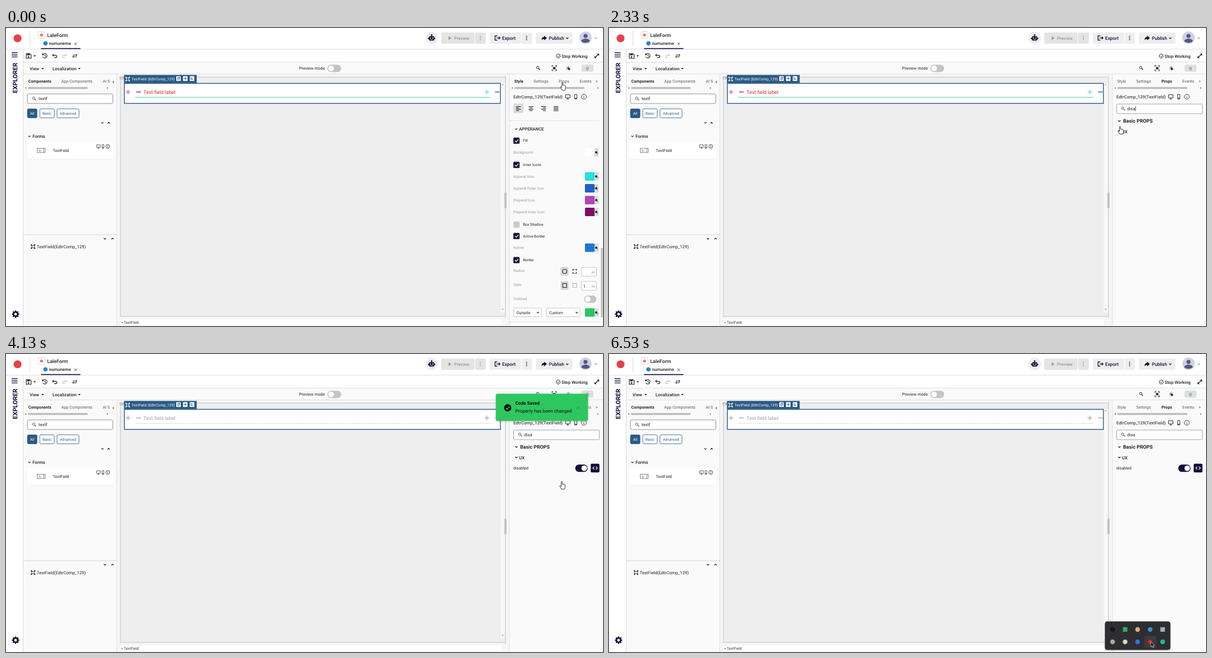
Recreate the animation shown at these times as an HTML page. Size 1059 px wide and 529 px high, loop 7.27 s.

```html
<!DOCTYPE html>
<html lang="en">
<head>
<meta charset="utf-8">
<title>Editor</title>
<style>
html, body { margin: 0; width: 100%; height: 100%; overflow: hidden; background: #fff; }
svg { display: block; width: 1059px; height: 529px; }
text { font-family: Roboto, Arial, sans-serif; text-rendering: geometricPrecision; white-space: pre; }
</style>
</head>
<body>
<svg id="stage" viewBox="0 0 1059 529" xmlns="http://www.w3.org/2000/svg"></svg>
<script>
const NAVY = '#12103a', INK = '#222', GREY = '#999', BLUE = '#2b5a85', LINE = '#d9d9d9';

// Drawing helpers, each returns SVG markup
const text = (x, y, size, str, fill = INK, weight = 400, anchor = 'start') =>
  `<text x="${x}" y="${y}" font-size="${size}" fill="${fill}" font-weight="${weight}" text-anchor="${anchor}">${str}</text>`;
const rect = (x, y, w, h, fill = 'none', stroke = 'none', r = 0, sw = 1) =>
  `<rect x="${x}" y="${y}" width="${w}" height="${h}" fill="${fill}" stroke="${stroke}" stroke-width="${sw}" rx="${r}"/>`;
const circle = (x, y, r, fill = 'none', stroke = 'none', sw = 1) =>
  `<circle cx="${x}" cy="${y}" r="${r}" fill="${fill}" stroke="${stroke}" stroke-width="${sw}"/>`;
const path = (d, stroke = INK, sw = 1, fill = 'none', extra = '') =>
  `<path d="${d}" stroke="${stroke}" stroke-width="${sw}" fill="${fill}" ${extra}/>`;
const shape = (d, fill = INK) => path(d, 'none', 0, fill);
const group = (id, body, extra = '') => `<g id="${id}" ${extra}>${body}</g>`;
const at = (x, y, body, extra = '') => `<g transform="translate(${x} ${y}) ${extra}">${body}</g>`;

// Small icons
const chevron = (x, y, turn = 0, c = INK, s = 2) =>
  at(x, y, path(`M${-s} ${-s / 2}L0 ${s / 2}L${s} ${-s / 2}`, c, 1.1), `rotate(${turn})`);
const caret = (x, y, c = INK) => shape(`M${x - 2.3} ${y - 1}h4.6l-2.3 2.4z`, c);
const arrowHead = (x, y, turn, c = '#8a8a8a') => at(x, y, shape('M-2 -1h4l-2 2.4z', c), `rotate(${turn})`);
const magnifier = (x, y, c = '#555') =>
  circle(x - .8, y - .8, 2.1, 'none', c) + path(`M${x + .8} ${y + .8}l2.6 2.6`, c, 1.2);
const plus = (x, y, c) => path(`M${x - 4} ${y}h8M${x} ${y - 4}v8`, c, 1.2);
const minus = (x, y, c) => path(`M${x - 4} ${y}h8`, c, 1.3);
const cross = (x, y, s, c, w = 1) => path(`M${x - s} ${y - s}l${2 * s} ${2 * s}m0 ${-2 * s}l${-2 * s} ${2 * s}`, c, w);
const kebab = (x, y, c) => [-3, 0, 3].map(d => circle(x, y + d, .9, c)).join('');
const monitor = (x, y, s = 1) =>
  at(x, y, path('M-4 -3.5h8v5.5h-8zM-2 4h4M0 2v2', '#333', 1), `scale(${s})`);
const phone = (x, y, s = 1) => at(x, y, path('M-2 -4h4v8h-4zM-2 2.6h4', '#333', 1), `scale(${s})`);
const info = (x, y, r) => circle(x, y, r, 'none', '#333', .9) + path(`M${x} ${y - r * .6}v1M${x} ${y - r * .1}v${r * .65}`, '#333', 1);
const frameIcon = (x, y, c) =>
  rect(x - 2.2, y - 2.2, 4.4, 4.4, 'none', c, 0, .9) +
  [[-3, -3], [3, -3], [-3, 3], [3, 3]].map(([a, b]) => rect(x + a - 1, y + b - 1, 2, 2, c)).join('');
const toggle = (x, y, on = false) =>
  rect(x, y, 22, 13, on ? NAVY : '#c4c4c4', 'none', 6.5) + circle(x + (on ? 16 : 6.5), y + 6.5, 4.9, '#fff');
const hScroll = (x, w, left, right) =>
  rect(x, 104.7, w, 3.6, '#bdbdbd', 'none', 1.5) + arrowHead(left, 106.5, 90) + arrowHead(right, 106.5, -90);

function header() {
  const button = (x, w, fill) => rect(x, 8, w, 20, fill, 'none', 2);
  return rect(0, 0, 1059, 37, '#fff') + rect(0, 37, 1059, 1, '#dedede') +
    circle(20.5, 18.3, 7, '#e94046') + rect(42, 5, 1, 27, LINE) +
    rect(57, 6.5, 12, 12, '#fff', '#ccc', 2, .8) + circle(63, 12.5, 2.8, '#e88078') +
    text(73, 15.8, 8.8, 'LaleForm', INK, 500) +
    circle(70, 27.3, 3.8, '#2a84c4') + text(76.3, 30, 7.7, 'numuneme', INK, 500) + cross(123.5, 28, 2.2, '#444') +
    rect(62, 35.7, 70, 1.6, NAVY) +
    circle(755, 17.5, 11, '#eee') + rect(750.5, 14.5, 9, 8, NAVY, 'none', 1.8) + rect(748.6, 17, 12.8, 3, NAVY, 'none', 1) +
    path('M755 15v-3', NAVY, 1.2) + circle(755, 12.2, 1.2, NAVY) + circle(752.8, 17.8, 1.1, '#eee') + circle(757.2, 17.8, 1.1, '#eee') +
    path('M753 20.7h4', '#eee', .9) +
    button(772, 59, '#e4e4e4') + button(832, 19, '#e4e4e4') + shape('M785 14.5l5.5 3.4l-5.5 3.4z', '#a0a0a0') +
    text(795, 20.6, 7.7, 'Preview', GREY, 500) + kebab(841.5, 17.7, GREY) +
    button(858, 56, '#eee') + button(915, 18, '#eee') +
    path('M871.5 14h-4v7.5h4M870 17.7h6M874 15.4l2.4 2.3l-2.4 2.3', NAVY, 1.3) +
    text(880, 20.7, 8.25, 'Export', NAVY, 500) + kebab(923.5, 17.7, NAVY) +
    button(940, 65, '#eee') + shape('M950 21.5c0-4 2-5.500 4.500-5.500v-2.400l5 4.200l-5 4.200v-2.400c-2 0-3.500.5-4.500 1.900z', NAVY) +
    text(963, 20.7, 8.1, 'Publish', NAVY, 500) + chevron(995.5, 18, 0, NAVY) +
    circle(1028, 17.2, 11, '#cfd0e3') + circle(1028, 14, 3.6, '#55577f') +
    shape('M1020.500 23.500c0-6 15-6 15 0c-3 3.500-12 3.500-15 0z', '#55577f') + chevron(1046, 18, 0, GREY);
}

function toolbars() {
  return rect(31, 38, 1028, 22.500, '#fff') + rect(31, 60, 1028, 21.500, '#fafafa') +
    rect(31, 60, 1028, .8, LINE) + rect(31, 81, 1028, .8, LINE) +
    path('M36 45.500h6.500l2 2v6.500h-8.500z', INK, 1.2) + rect(37.500, 46, 4.500, 2.500, INK) + circle(40, 51.500, 1.400, INK) + caret(51, 49.500) +
    path('M65.500 47a4 4 0 1 1 -.3 4M69.300 47v2.700l2 1.200M64.700 45v2.600h2.600', INK, 1.1) +
    path('M84.500 46.300l-1.800 2l2 2M83 48.300h4.500q2.700 0 2.700 2.400q0 2-2.700 2h-2', INK, 1.2) +
    path('M105.500 46.300l1.800 2l-2 2M107 48.300h-4q-2.700 0-2.700 2.400q0 2 2.700 2h2', '#c8c8c8', 1.2) +
    path('M118.500 48h7M124 46.200l2 1.800l-2 1.800M125.500 51h-7M120 49.300l-2 1.700l2 1.700', INK, 1) +
    path('M982.300 47.200a3.600 3.600 0 1 0 1 2.200M977.800 49.300l1.800 1.800l3.700-4', INK, 1) +
    text(985.5, 52.600, 7.7, 'Stop Working', INK, 500) +
    path('M1048.500 46h3v3M1051.500 46l-7 7M1044.500 50v3h3', INK, 1.2) +
    text(42, 74.500, 7.7, 'View', INK, 500) + caret(65, 72) + text(82.500, 74.500, 7.8, 'Localization', INK, 500) + caret(130, 72) +
    text(520, 74.300, 7.25, 'Preview mode') + rect(570, 65.200, 24.500, 13, '#c4c4c4', 'none', 6.5) + circle(576.700, 71.700, 5, '#fff') +
    magnifier(944, 71, INK) +
    path('M968.500 69v-2.300h2.300M974 66.700h2.500v2.300M976.500 73.500v2.300h-2.500M970.800 75.800h-2.300v-2.300', INK, 1) + cross(972.5, 71.2, 2.2, INK, 1.400) + circle(972.5, 71.2, 1.800, INK) +
    cross(997.5, 71.5, 3, '#555', .8) + path('M994 71.500h7M997.500 67.500v7', '#555', .8) + shape('M996.500 70l5 3.300l-2.300.4l-.4 2.300z', '#111') +
    rect(1021, 65, 21, 12.500, '#dedede', 'none', 2) + text(1031.5, 74.500, 8.3, '0', '#4caf50', 700, 'middle');
}

function leftSide() {
  const pill = (x, w, label, on) =>
    rect(x, 143.500, w, 16, on ? BLUE : '#fff', BLUE, 2, .8) + text(x + w / 2, 153.800, 6.6, label, on ? '#fff' : BLUE, 400, 'middle');
  return rect(0, 38, 30, 491, '#fff') + rect(30, 38, 1, 491, LINE) + path('M10 44h10.500M10 47.700h10.500M10 51.400h10.500', NAVY, 1.4) +
    at(20, 115.500, text(0, 0, 11, 'EXPLORER', NAVY, 700), 'rotate(-90)') +
    path('M17 501.500v13M10.500 508h13M12.400 503.400l9.200 9.200M21.600 503.400l-9.200 9.200', NAVY, 2.6) + circle(17, 508, 3.700, '#fff', NAVY, 2.6) +
    rect(31, 82, 166, 447, '#fafafa') + rect(196, 82, .8, 447, LINE) +
    text(39.5, 96.600, 7.15, 'Components', INK, 700) + text(98, 96.600, 7.15, 'App Components', '#555') + text(171.700, 96.600, 7.15, 'AI S', '#555') +
    chevron(190.500, 96, 90, '#666') + hScroll(39, 106, 35, 180) +
    rect(38, 117, 151.5, 17, '#fff', '#8a8a8a', 2, .9) + magnifier(50, 125.300) + text(57.700, 128.200, 7.7, 'textf') +
    pill(38, 17, 'All', true) + pill(60, 25.500, 'Basic') + pill(90.500, 39, 'Advanced') +
    chevron(171, 168.300) + chevron(182, 168.300, 180) + chevron(41.500, 192.300) + text(47, 195.200, 7.8, 'Forms', INK, 500) +
    rect(38, 202.500, 152, 31, '#f0f0f0', 'none', 2) + rect(38, 202, 152, 30.500, '#fff', 'none', 2) +
    rect(55.500, 213.500, 14, 7.5, '#fff', '#666', 0, .8) + text(57.500, 219.500, 5.5, 'T|', '#444') + path('M67 213.500v7.500', '#666', .8) +
    text(83, 219.700, 7.1, 'TextField') + monitor(164, 210.200, .8) + phone(172, 210.200, .8) + info(180.500, 210.200, 3.4) +
    rect(31, 366.500, 166, .9, '#d0d0d0') + chevron(175.500, 374) + chevron(189, 374, 180) +
    frameIcon(48, 388, INK) + text(54.500, 390.700, 7.7, 'TextField(EdtrComp_129)');
}

function canvasArea() {
  const field = (id, c1, c2, c3, c4, label, line) => group(id,
    plus(216.500, 113.500, c1) + minus(235, 113.500, c2) + text(244, 116.500, 8.8, 'Text field label', label) +
    plus(853, 113.500, c3) + minus(871.500, 113.500, c4) + line);
  const tagIcon = x => rect(x - 4, 85.500, 8, 8.500, '#fff', 'none', 1);
  return rect(197, 82, 696, 447, '#f6f6f6') + rect(203, 87, 683, 425, '#eee', '#c4c4c4', 0, 1) +
    text(200.500, 90.500, 6.6, '120', '#777') +
    rect(877.500, 97, 7.500, 408, '#f8f8f8') + arrowHead(881, 100.500, 180, '#aaa') + arrowHead(881, 499.500, 0, '#aaa') +
    rect(210, 98.300, 667, 35.500, '#fff', BLUE, 0, 1.4) + rect(209.300, 83.300, 129, 14.500, BLUE) +
    frameIcon(215.800, 90.600, '#fff') + text(222.700, 93.300, 6.65, 'TextField (EdtrComp_129)', '#fff') +
    [306, 318, 330].map(tagIcon).join('') + path('M304.500 88h2.500v4h-2.500zM305.800 87h2.500v3.500', BLUE, .8) +
    path('M315.300 89.700h5.400M318 87v5.400', BLUE, 1) + path('M328 87.300v4.200h4M328 89h3.500', BLUE, .9) +
    field('enabled', '#ab47bc', '#7b1060', '#45d3da', '#1b4f94', '#d8262c', path('M228.500 123.100H859.500', '#48d185', 1)) +
    field('disabled', GREY, GREY, GREY, GREY, '#a2a2a2', path('M230 123.100H859', '#a8a8a8', .8, 'none', 'stroke-dasharray="1 1.100"')) +
    rect(203, 517.500, 675, 9.5, '#fff') + text(204, 525.200, 6.6, '&gt; TextField', '#333') +
    rect(885.500, 82, .8, 434, '#d4d4d4') + rect(883.800, 291, 4.200, 30, '#dcdcdc', 'none', 1) + path('M885.200 293v26M887 293v26', '#9a9a9a', .7);
}

function tabs(active, x) {
  return ['Style', 'Settings', 'Props', 'Events'].map((name, i) =>
    text(x[i], 96.700, 7.15, name, i === active ? INK : '#555', i === active ? 700 : 400)).join('');
}

function stylePanel() {
  const check = (y, label, on = true) => rect(900, y - 5.500, 11, 11, on ? NAVY : '#c9c9c9', 'none', 1.5) +
    (on ? path(`M902.800 ${y}l2.200 2.300l4-4.500`, '#fff', 1.2) : '') + text(917, y + 2.300, 6.6, label);
  const label = (y, str) => text(900, y + 2.200, 6.6, str, GREY);
  const swatch = (y, c) => rect(1027, y - 7.500, 17, 15, c, 'none', 1.500) + rect(1044, y - 7.500, 7, 15, '#dcdcdc') +
    at(1047, y, rect(-1.800, -1.800, 3.600, 3.600, '#222'), 'rotate(45)') + circle(1049.500, y + 2.500, .7, '#222');
  const color = (y, str, c) => label(y, str) + swatch(y, c);
  const align = [0, 1, 2, 3].map(i => [-3, -1, 1, 3].map((dy, row) => {
    const w = row % 2 && i < 3 ? 5 : 8.500, cx = 909 + 22.200 * i;
    const x = [cx - 4.250, cx - w / 2, cx + 4.250 - w, cx - 4.250][i];
    return rect(x, 142.600 + dy * 1.200, w, 1.100, INK);
  }).join('')).join('');
  const select = (x, w, str) => rect(x, 497, w, 15.500, '#fff', '#bbb', 1.500, .8) +
    text(x + 5, 507.500, 7.15, str) + chevron(x + w - 6, 505, 0, INK, 1.800);
  const sizeRow = (y, str, value) => rect(984.500, y - 7, 12.500, 14, '#ddd', '#c4c4c4', 1) +
    rect(1020.500, y - 7, 27, 15.500, '#fff', '#bbb', 1.5, .8) + text(1024, y + 3.700, 7.15, value) + text(1039, y + 3.300, 5.5, 'px', '#888') + label(y - 1.500, str);
  return tabs(0, [901.500, 936, 980.500, 1017.500]) + hScroll(902, 124, 898, 1050) +
    rect(900, 134, 18, 17, '#dcdcdc', 'none', 1.5) + align + rect(893, 164.300, 160, .8, '#ddd') +
    chevron(905, 179.300) + text(910, 182, 7.7, 'APPERANCE', INK, 500) +
    check(200, 'Fill') + color(220.700, 'Background', '#fff') + check(243, 'Inner Icons') +
    color(263.500, 'Append Icon', '#25dfe0') + color(284.500, 'Append Outer Icon', '#1b62cc') +
    color(305.500, 'Prepend Icon', '#b047b8') + color(326.500, 'Prepend Inner Icon', '#7c0e68') +
    check(349, 'Box Shadow', false) + check(369.300, 'Active Border') + color(390, 'Active', '#1c77d2') + check(412, 'Border') +
    sizeRow(432, 'Radius', '') + rect(987.500, 428.500, 7, 7, 'none', INK, 1.8, 1.1) +
    path('M1005.500 430.800v-2.300h2.300M1009.700 428.500h2.300v2.300M1012 433.200v2.300h-2.300M1007.800 435.500h-2.300v-2.300', INK, 1.100) +
    sizeRow(457, 'Style', '1') + rect(987.500, 453.500, 7, 7, 'none', INK, 0, 1.1) +
    path('M1005.500 453.500h7v7h-7z', '#777', .9, 'none', 'stroke-dasharray="1.200 .8"') +
    label(480.500, 'Outlined') + toggle(1025.300, 475) +
    select(900.500, 49, 'Outside') + select(958.500, 60, 'Custom') + swatch(505, '#25c663') + rect(893, 521, 160, .8, '#ddd') +
    rect(1055.300, 390, 3, 124, '#b8b8b8', 'none', 1.5) + arrowHead(1056.700, 519);
}

function propsPanel() {
  const head = (y, str) => chevron(905.300, y) + text(912, y + 3, 8.8, str, INK, 600);
  const item = (y, str, open) => chevron(905.300, y - .500, open ? 0 : -90) + text(910, y + 2.800, 7.7, str, INK, 500);
  return tabs(2, [901.500, 935.200, 980, 1017]) + hScroll(902, 124, 898, 1050) +
    rect(900.500, 135, 152, 17, '#fff', '#999', 2, .9) + magnifier(912, 143) +
    '<text id="query" x="919" y="146" font-size="7.7" fill="#222"></text>' + group('caret', rect(0, 138.700, .8, 9, INK)) +
    head(165, 'Basic PROPS') + group('closedUx', item(184, 'UX', false)) +
    group('advanced', head(203.200, 'Advanced PROPS') + item(222.500, 'Quick') + item(241.500, 'UX')) + group('extra', item(260.500, 'Style')) +
    group('openUx', item(184, 'UX', true) + text(900, 205.200, 7.15, 'disabled') +
      group('off', toggle(1009.700, 196.300)) + group('on', toggle(1009.700, 196.300, true)) +
      rect(1037.200, 194.700, 15.500, 15.500, NAVY, 'none', 2) + path('M1043.500 200l-2.500 2.500l2.500 2.500M1046.500 200l2.500 2.500l-2.500 2.500', '#fff', 1.100));
}

function rightSide() {
  return rect(893, 82, 166, 447, '#fafafa') + rect(892.500, 82, .8, 447, LINE) + text(1046, 97, 7.15, '&gt;', '#333') +
    text(900, 124.600, 7.7, 'EdtrComp_129(TextField)', '#444', 500) + monitor(996.500, 122) + phone(1010.700, 122) + info(1025, 122, 4.400) +
    group('styles', stylePanel()) + group('props', propsPanel());
}

function toast() {
  return rect(876.500, 70.500, 163.500, 48.300, '#2ec75f', 'none', 3) + circle(897.500, 95.500, 6.500, '#111') +
    path('M894.300 95.700l2.300 2.400l4-4.700', '#2ec75f', 1.500) + text(911, 90, 8.1, 'Code Saved', '#111', 700) +
    text(911, 104, 8.25, 'Property has been changed', '#111') + cross(1022.500, 95.500, 2.600, '#1c9a47', 1);
}

function tray() {
  const colors = ['#151515', '#2fae5f', '#d3b676', '#3a8fd6', '#9fb0b8', '#aaa', '#dfd2b8', '#2d74e8', '#d6222e', '#22b8a0'];
  const isSquare = i => [1, 4].includes(i);
  return rect(880, 475, 115.500, 50, '#2d2e30', '#202020', 4, .6) + rect(949.500, 500.500, 21.500, 21, '#3a3b3d', 'none', 2) +
    colors.map((c, i) => {
      const x = 893.300 + 22.200 * (i % 5), y = i < 5 ? 489 : 511;
      return isSquare(i) ? rect(x - 4, y - 4, 8, 8, c) : circle(x, y, i === 8 ? 3.800 : 4.200, c);
    }).join('');
}

const handShape = path('M-1.100 .8q0-1.200 1-1.200t1 1.200v4.200q1-1 1.700 0q1-.8 1.700.2q1.500-.5 1.500 1.200v3q0 1.800-1.200 4h-5.200q-1-2.500-3-4.700q-.6-1.300.8-1.300l1.700 1.300z', '#222', .9, '#fff');
const arrowShape = path('M0 0v9.500l2.200-2l1.600 3.700l1.600-.7l-1.600-3.600h3z', '#fff', .6, '#111');

const stage = document.getElementById('stage');
stage.innerHTML = '<defs><filter id="shadow" x="-10%" y="-20%" width="120%" height="150%"><feDropShadow dx="0" dy="1" stdDeviation="1.6" flood-opacity=".22"/></filter></defs>' +
  rect(0, 0, 1059, 529, '#fff') + header() + toolbars() + leftSide() + canvasArea() + rightSide() +
  group('toast', toast(), 'filter="url(#shadow)"') + group('tray', tray(), 'filter="url(#shadow)"') +
  group('hand', handShape) + group('arrow', arrowShape);

const el = {};
stage.querySelectorAll('[id]').forEach(node => el[node.id] = node);

// Pointer: time, x, y, look until the next row
const POINTER = [
  [0, 987, 97, 'hand'], [130, 989, 93.500, 'hand'], [330, 989, 93.500, 'hand'], [530, 966, 108, 'arrow'],
  [1000, 908, 147, 'arrow'], [1870, 908, 147, ''], [2130, 908, 150, 'arrow'], [2270, 907, 168, 'hand'],
  [2400, 906, 183, 'hand'], [2600, 906, 183, 'hand'], [3130, 1021.500, 203.500, 'hand'], [3530, 1021.500, 203.500, 'hand'],
  [3800, 986, 226.500, 'hand'], [4270, 986, 226.500, 'arrow'], [4670, 960, 511, 'arrow'], [4730, 960, 529, ''],
  [5730, 1024, 197, 'arrow'], [6000, 944.500, 525, 'arrow'], [6130, 938, 518, 'arrow'], [6330, 939.500, 511, 'arrow'],
  [6530, 961, 510.500, 'arrow'], [7270, 961, 510.500, 'arrow']
];
const TOAST = [[3600, 183], [3870, 29], [4070, -13], [4270, 5], [4470, -2.500], [4600, 0], [4930, 0], [5000, 95], [5070, 183]];
const QUERY = [[0, ''], [1330, 'd'], [1530, 'di'], [1600, 'dis'], [2070, 'disa']];
const LOOP = 7270, TICK = 200 / 3;

const lastRow = (rows, t) => rows.filter(row => row[0] <= t).pop() || rows[0];
function mix(rows, t, col) {
  const a = lastRow(rows, t), b = rows[rows.indexOf(a) + 1];
  if (!b || t <= a[0]) return a[col];
  return a[col] + (b[col] - a[col]) * (t - a[0]) / (b[0] - a[0]);
}
const show = (id, on) => el[id].style.display = on ? '' : 'none';

function draw(now) {
  const t = Math.round(Math.floor((now % LOOP + 4) / TICK) * TICK / 10) * 10;
  const inProps = t >= 330;
  show('styles', !inProps);
  show('props', inProps);
  show('extra', t < 1530);
  show('advanced', t < 1670);
  show('closedUx', t < 2600);
  show('openUx', t >= 2600);
  show('off', t < 3530);
  show('on', t >= 3530);
  show('enabled', t < 3600);
  show('disabled', t >= 3600);
  show('tray', t >= 6200);

  el.query.textContent = lastRow(QUERY, t)[1];
  show('caret', inProps && t < 2400);
  if (inProps) el.caret.setAttribute('transform', `translate(${919.300 + el.query.getComputedTextLength()} 0)`);

  show('toast', t >= 3600 && t < 5070);
  el.toast.setAttribute('transform', `translate(${mix(TOAST, t, 1)} 0)`);

  const look = lastRow(POINTER, t)[3];
  for (const id of ['hand', 'arrow']) {
    show(id, look === id);
    el[id].setAttribute('transform', `translate(${mix(POINTER, t, 1)} ${mix(POINTER, t, 2)})`);
  }
}

const start = performance.now();
function frame() {
  draw(performance.now() - start);
  requestAnimationFrame(frame);
}
frame();
</script>
</body>
</html>
```
